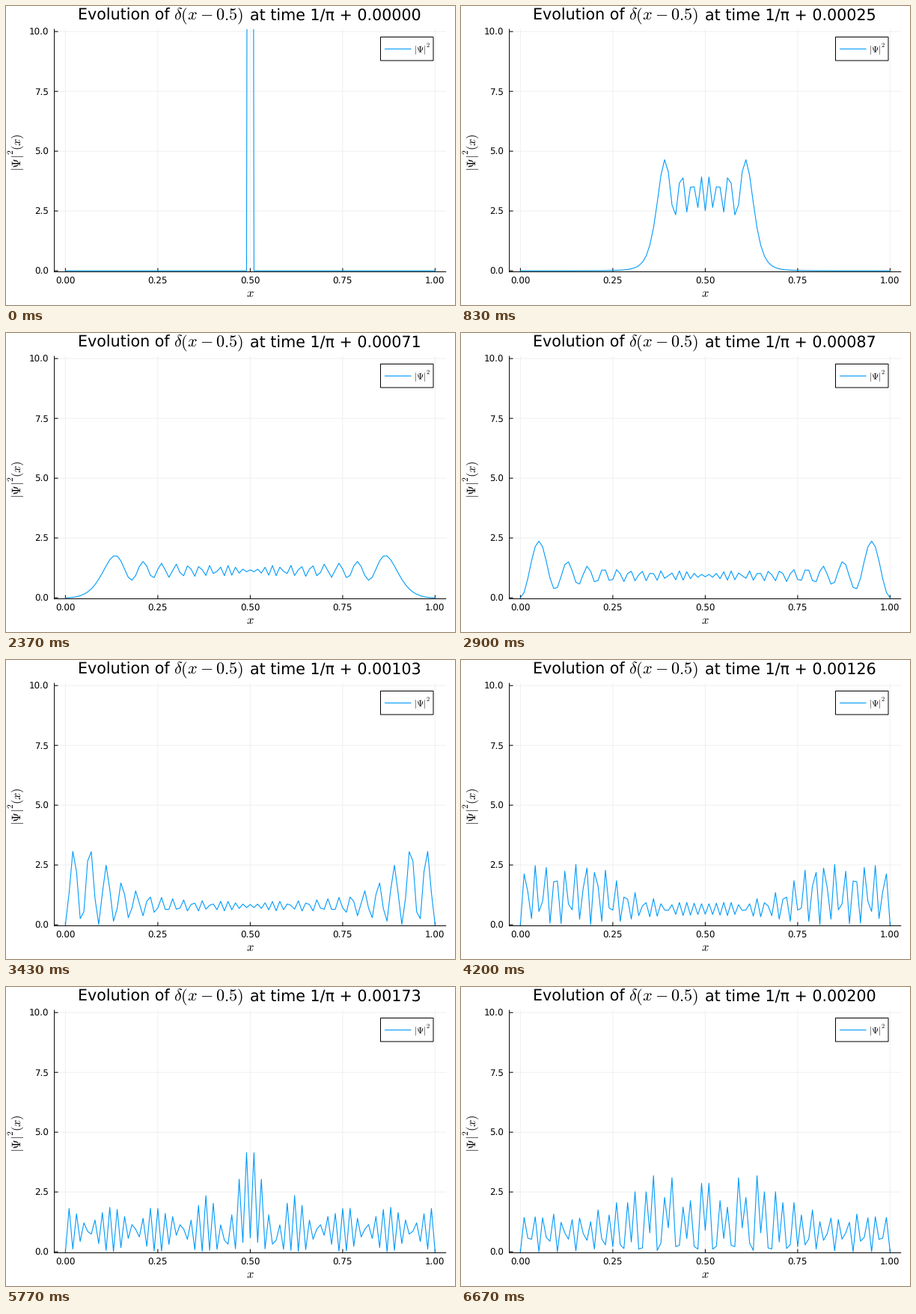
These frames come from a looping animation (600x400 px, 6.71 s). A matplotlib script:

```python
import numpy as np
import matplotlib.pyplot as plt
from matplotlib.animation import FuncAnimation
from matplotlib.patches import Rectangle

plt.rcParams["font.family"] = "DejaVu Sans"
plt.rcParams["mathtext.fontset"] = "cm"
plt.rcParams["text.hinting"] = "none"

W, H, DPI = 600, 400, 100
TICK_MS, LOOP_MS = 10, 6710
STEPS, FPS, DT = 201, 30, 1e-5
PT = 72 / DPI
BLUE, GRID = "#009AFA", "#f0f0f0"
LEFT, RIGHT, TOP, BOTTOM = 64.6, 588.2, 30.6, 355.6

# Box eigenstates up to n = 100, starting from a normalised delta at x = 0.5
x = np.linspace(0, 1, 101)
k = np.pi * np.arange(1, 101)
coef = 2 * np.sin(k / 2) / 10
modes = np.sin(np.outer(x, k))


def density(t):
    return np.abs(modes @ (coef * np.exp(-1j * k**2 * t))) ** 2


def px(v):
    return 79.4 + 494 * v


def py(v):
    return 354.2 - 32 * v


fig = plt.figure(figsize=(W / DPI, H / DPI), dpi=DPI, facecolor="white")
ax = fig.add_axes([0, 0, 1, 1])
ax.axis("off")


def label(tx, ty, s, size, ha="left", **kw):
    return ax.text(tx, ty, s, fontsize=size * PT, ha=ha, va="baseline", **kw)


def psi_squared(tx, ty, size, upright=True, tail=""):
    """|Psi|^2 with a tight, high exponent, running right or upwards."""
    parts = [(r"$|\Psi|$", 0, 0, 1), ("$2$", 1.334, 0.6, 0.7)]
    if tail:
        parts.append((tail, 1.69, 0, 1))
    for s, along, rise, scale in parts:
        dx, dy = (along, -rise) if upright else (-rise, -along)
        label(tx + dx * size, ty + dy * size, s, size * scale, zorder=5,
              rotation=0 if upright else 90, rotation_mode="anchor")


xt, yt = np.linspace(0, 1, 5), np.linspace(0, 10, 5)
line = dict(lw=PT, snap=False)
ax.vlines(px(xt), TOP, BOTTOM, color=GRID, zorder=1, **line)
ax.hlines(py(yt), LEFT, RIGHT, color=GRID, zorder=1, **line)
ax.vlines(px(xt), BOTTOM - 5, BOTTOM, color="black", zorder=2, **line)
ax.hlines(py(yt), LEFT, LEFT + 5, color="black", zorder=2, **line)
ax.vlines(LEFT, TOP, BOTTOM + 0.5, color="black", zorder=2, **line)
ax.hlines(BOTTOM, LEFT - 0.5, RIGHT, color="black", zorder=2, **line)
for v in xt:
    label(px(v), 371.4, f"{v:.2f}", 11.9, "center")
for v in yt:
    label(56.8, py(v) + 4.4, f"{v:.1f}", 11.9, "right")

label(96, 19.2, "Evolution of", 20.7)
label(224.4, 19.2, r"$\delta(x-0.5)$", 22.2)
title = label(325.5, 19.2, "", 20.7)
label(326.2, 388.6, "$x$", 16.6, "center")
psi_squared(20, 221, 16.4, upright=False, tail="$(x)$")

curve, = ax.plot(px(x), py(0 * x), color=BLUE, lw=1.1 * PT, zorder=3,
                 solid_joinstyle="round", snap=False)
ax.set_xlim(0, W)
ax.set_ylim(H, 0)
curve.set_clip_path(Rectangle((LEFT, TOP), RIGHT - LEFT, BOTTOM - TOP,
                              transform=ax.transData))

ax.add_patch(Rectangle((500.5, 41.5), 70.5, 31.5, fc="white", ec="black",
                       lw=PT, zorder=4, snap=False))
ax.hlines(57.5, 506, 541.5, color=BLUE, lw=1.1 * PT, zorder=5, snap=False)
psi_squared(545, 62, 11.9)


def update(tick):
    # The picture advances at 30 steps a second on a 10 ms clock
    step = min(int((tick + 0.5) * TICK_MS * FPS / 1000), STEPS - 1)
    t = step * DT
    title.set_text(f"at time 1/π + {t:.5f}")
    curve.set_ydata(py(density(t)))
    return curve, title


anim = FuncAnimation(fig, update, frames=LOOP_MS // TICK_MS, interval=TICK_MS,
                     init_func=lambda: update(0), repeat=True, repeat_delay=0)
plt.show()
```
